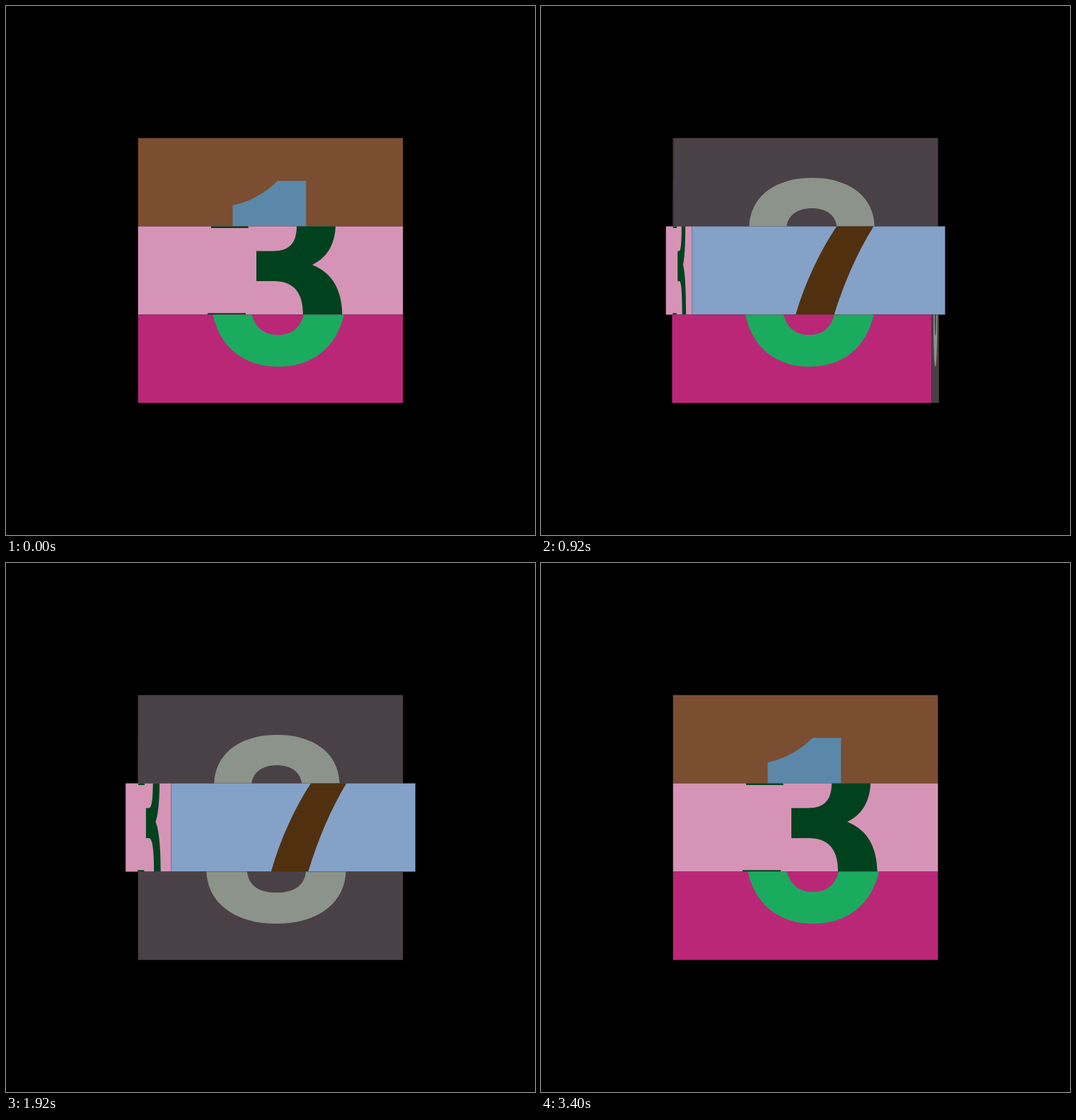
Animation of 748x748 px, one loop 3440 ms. Source, as an HTML page:

```html
<!DOCTYPE html>
<html lang="en">
<head>
<meta charset="utf-8">
<title>Turning number bands</title>
<style>
  html, body { margin: 0; width: 100%; height: 100%; overflow: hidden; background: #000; }
  svg { display: block; width: 100%; height: 100%; }
</style>
</head>
<body>
<svg id="stage" viewBox="0 0 748 748"></svg>
<script>
const LOOP = 3440, STEP = 40;
const X = 186.7, W = 374.6, H = W / 3, CENTER = 374;

// Each band has two faces side by side. peak is a face's relative width halfway
// through a turn; out and back hold the halfway time and length of each turn in ms.
const bands = [
  {
    peak: 0.596, out: [520, 952], back: [2280, 800],
    faces: [
      { fill: '#7b4d31', ink: '#5b88a8',
        d: 'M320.5 311.6V282Q357 274 384 247.3H424.3V311.6Z' },
      { fill: '#4a4147', ink: '#8b938b',
        d: 'M294 311.6C296 268 332 243 383 243C434 243 470 268 471.5 311.6' +
           'H418C416 295 402 286 383 286C362 286 349 296 347 311.6Z' }
    ]
  },
  {
    peak: 0.687, out: [760, 1143], back: [2000, 800],
    faces: [
      { fill: '#d594b6', ink: '#00421e',
        d: 'M354 346.5H378C400 346.5 411 336 411 311.6H466C465 338 453 357 433 366' +
           'C461 377 475 401 475.5 436.4H420C420 404 406 389 378 389H354Z' +
           'M290 311.6H342L343 314H290ZM285 434.3H339V436.4H285Z' },
      { fill: '#84a1c8', ink: '#50300e',
        d: 'M401 311.6H455.5C431 349 412 391 397 436.4H340C355 389 376 347 401 311.6Z' }
    ]
  },
  {
    peak: 0.575, out: [1160, 1098], back: [2523, 1098],
    faces: [
      { fill: '#bb2777', ink: '#1aab5e',
        d: 'M292.5 436.4C303 484 338 510 385 510C433 510 467 483 478 436.4' +
           'H421C416 455 404 465 384.5 465C365 465 353 455 347.5 436.4Z' },
      { fill: '#4a4147', ink: '#8b938b',
        d: 'M283.5 436.4C285 481 325 510 382 510C439 510 479 482 480.5 436.4' +
           'H424C422 456 407 466 382.5 466C358 466 343 456 341 436.4Z' }
    ]
  }
];

function add(parent, tag, attrs = {}) {
  const el = document.createElementNS('http://www.w3.org/2000/svg', tag);
  for (const key in attrs) el.setAttribute(key, attrs[key]);
  return parent.appendChild(el);
}

const stage = document.getElementById('stage');
bands.forEach((band, i) => {
  for (const face of band.faces) {
    face.node = add(stage, 'g');
    add(face.node, 'rect', { x: X, y: X + i * H, width: W, height: H, fill: face.fill });
    add(face.node, 'path', { d: face.d, fill: face.ink });
  }
});

// Exponential ease in and out
function turn(t, [middle, length]) {
  const u = (t - middle) / length;
  if (u <= -0.5) return 0;
  if (u >= 0.5) return 1;
  return u < 0 ? 2 ** (20 * u - 1) : 1 - 2 ** (-20 * u - 1);
}

function grow(p, peak) {
  return p < 0.5 ? 2 * p * peak : peak + (2 * p - 1) * (1 - peak);
}

function place(face, left, scale) {
  face.node.setAttribute('display', scale > 0 ? 'inline' : 'none');
  face.node.setAttribute('transform', `translate(${left - X * scale} 0) scale(${scale} 1)`);
}

function draw(t) {
  for (const { peak, out, back, faces } of bands) {
    const p = turn(t, out) - turn(t, back);
    const a = grow(1 - p, peak), b = grow(p, peak);
    const left = CENTER - (a + b) * W / 2;
    place(faces[0], left, a);
    place(faces[1], left + a * W, b);
  }
}

function tick() {
  const t = performance.now() % LOOP;
  draw(Math.floor(t / STEP) * STEP);
  requestAnimationFrame(tick);
}
tick();
</script>
</body>
</html>
```
